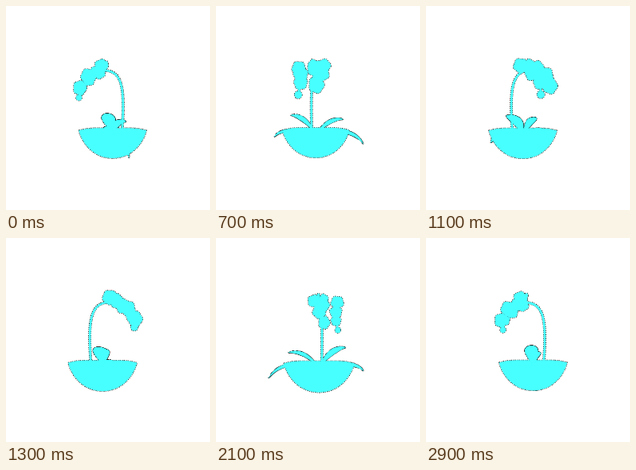
Animation, 256 px wide and 256 px high, one loop 3000 ms. Source, as an HTML page with a canvas:

```html
<!DOCTYPE html>
<html lang="en">
<head>
<meta charset="utf-8">
<title>Turning orchid</title>
<style>
html, body { margin: 0; width: 100%; height: 100%; overflow: hidden; background: #fff; }
canvas { display: block; width: 256px; height: 256px; }
</style>
</head>
<body>
<canvas id="stage" width="256" height="256"></canvas>
<script>
const ctx = document.getElementById('stage').getContext('2d');
const FILL = '#48ffff', STEPS = 30, STEP_MS = 100;
const MID = 128, CAMERA = 240;

// Points are [a, b, y]: two horizontal axes around the turning axis, and height.
const HUB = [5.9, -3.4, 155];
const ROOT = [5.9, -3.4, 162];
const STEM = [[18.5, -10.5, 158], [22, -12.5, 105], [20, -11, 80], [-3, 0, 81]];
const BUD = [-39, -17, 114];
// Petals: a, b, y, radius x, radius y
const PETALS = [
  [-2, 0, 72, 2, 3], [-8, 8, 77, 8, 8], [-8, -5, 76, 6, 7],
  [-12, -22, 80, 8, 8], [-14, -3, 82, 8, 8], [-26, -17, 90, 8, 8],
  [-24, 6, 89, 9, 9], [-35, 2, 103, 8, 9], [-36, -15, 101, 7, 7]
];
// Leaves: tip, control point, half width
const LEAVES = [
  { tip: [-1.6, -34, 137], mid: [0, -16, 138], w: 8.5 },
  { tip: [19, 31, 143], mid: [9, 14, 140], w: 5.5 },
  { tip: [20, 58, 175], mid: [14, 42, 150], w: 5.5 },
  { tip: [-3, -55, 164], mid: [-2, -45, 151], w: 4.5 }
];

let cos = 1, sin = 0;

// Turn a point and view it in perspective: screen x, y and scale.
function project([a, b, y]) {
  const s = CAMERA / (CAMERA - b * cos + a * sin);
  return [MID + (a * cos + b * sin) * s, MID + (y - MID) * s, s];
}
const spot = p => project(p).slice(0, 2);

function oval(x, y, rx, ry) {
  const path = new Path2D();
  path.ellipse(x, y, rx, ry, 0, 0, Math.PI * 2);
  return path;
}

function petal(p, i) {
  const path = new Path2D(), [x, y, s] = project(p);
  for (let k = 0; k < 40; k++) {
    const f = k * Math.PI / 20;
    const r = s * (1 + .07 * Math.sin(5 * f + i * 2));
    path.lineTo(x + p[3] * r * Math.cos(f), y + p[4] * r * Math.sin(f));
  }
  path.closePath();
  return path;
}

function leaf({ tip, mid, w }) {
  const away = Math.abs(tip[1] * cos - tip[0] * sin) / Math.hypot(tip[0], tip[1]);
  const face = .15 + .85 * away;
  const parts = [], n = 44;
  for (let k = 0; k <= n; k++) {
    const t = k / n, u = 1 - t;
    const [x, y, s] = project(ROOT.map((v, i) => u * u * v + 2 * u * t * mid[i] + t * t * tip[i]));
    const r = s * w * Math.sin(Math.PI * t ** 1.2);
    parts.push(oval(x, y, .5 + r * face, .5 + r * .3));
  }
  return parts;
}

function bowl() {
  const [x, y, s] = project(HUB), path = new Path2D();
  const at = (...v) => v.map((n, i) => i % 2 ? y + n * s : x + n * s);
  path.moveTo(...at(-43.2, 1.5));
  path.quadraticCurveTo(...at(-33, -1.5, -22, -1.5));
  path.lineTo(...at(22, -1.5));
  path.quadraticCurveTo(...at(33, -1.5, 43.2, 1.5));
  path.bezierCurveTo(...at(38, 21, 22, 37, 0, 37));
  path.bezierCurveTo(...at(-22, 37, -38, 21, -43.2, 1.5));
  path.closePath();
  return path;
}

function stalks() {
  const path = new Path2D();
  const [start, c, d, end] = STEM.map(spot);
  path.moveTo(...start);
  path.bezierCurveTo(...c, ...d, ...end);
  path.moveTo(...spot(PETALS[PETALS.length - 1]));
  path.lineTo(...spot(BUD));
  return path;
}

function draw(step) {
  const angle = step / STEPS * Math.PI * 2;
  cos = Math.cos(angle);
  sin = Math.sin(angle);
  const [bx, by, bs] = project(BUD);
  const shapes = [bowl(), ...LEAVES.flatMap(leaf), ...PETALS.map(petal),
    oval(bx, by, 4 * bs, 4 * bs)];
  const lines = stalks();

  ctx.fillStyle = '#fff';
  ctx.fillRect(0, 0, 256, 256);
  ctx.strokeStyle = '#000';
  ctx.setLineDash([1.5, 1.5, 1, 1]);
  ctx.lineWidth = 1.2;
  shapes.forEach(s => ctx.stroke(s));
  ctx.lineWidth = 3.7;
  ctx.stroke(lines);

  ctx.setLineDash([]);
  ctx.fillStyle = ctx.strokeStyle = FILL;
  ctx.lineWidth = 2.6;
  ctx.stroke(lines);
  shapes.forEach(s => ctx.fill(s));
}

const start = performance.now();
function tick() {
  draw(Math.floor((performance.now() - start) / STEP_MS) % STEPS);
  requestAnimationFrame(tick);
}
tick();
</script>
</body>
</html>
```
